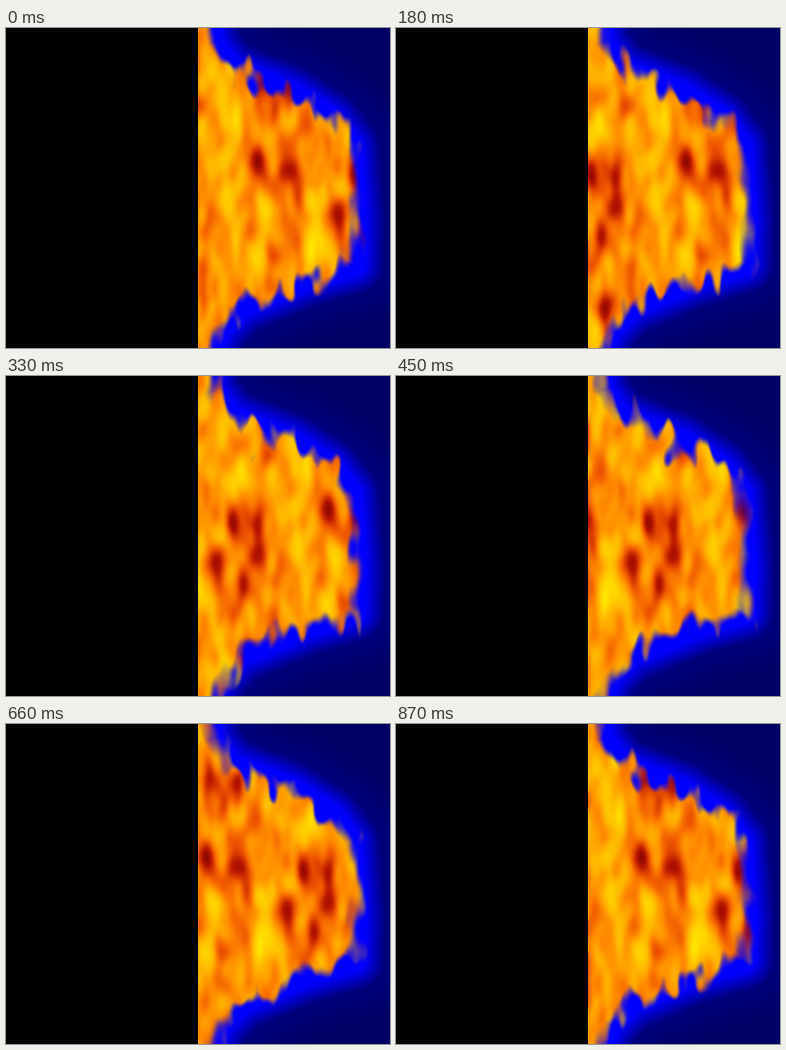
Recreate the animation shown at these times as a matplotlib script. Size 384 px wide and 320 px high, loop 900 ms.

```python
import numpy as np
import matplotlib.pyplot as plt
from matplotlib.animation import FuncAnimation
from matplotlib.path import Path

W, H, DPI = 384, 320, 100
SIDE = W // 2          # width of the flame panel and period of its texture
FRAMES, STEP = 30, 30
SPEED = SIDE / FRAMES  # the texture drifts right by one period per loop

X, Y = np.meshgrid(np.arange(SIDE) + 0.5, np.arange(H) + 0.5)

# Mean outline of the flame, in panel coordinates
OUTLINE = [(-80, -60), (8, -60), (13, 15), (33, 42), (93, 66), (133, 92),
           (152, 118), (157, 190), (156, 236), (108, 250), (43, 278),
           (21, 300), (10, 330), (4, 380), (-80, 380)]

# Main dark and bright patches on the periodic strip
EMBERS = [(66, 68), (58, 139), (88, 146), (90, 62), (139, 191), (184, 178),
          (178, 142), (172, 285), (156, 143), (168, 208)]
SPARKS = [(22, 55), (36, 108), (27, 170), (66, 190), (58, 240), (117, 165),
          (115, 215), (164, 98)]


def smooth(lo, hi, v):
    k = np.clip((v - lo) / (hi - lo), 0, 1)
    return k * k * (3 - 2 * k)


def depth(points):
    """Signed distance to a closed outline, positive inside."""
    best = np.full(X.shape, 1e9)
    for (ax, ay), (bx, by) in zip(points, points[1:] + points[:1]):
        dx, dy = bx - ax, by - ay
        k = np.clip(((X - ax) * dx + (Y - ay) * dy) / (dx * dx + dy * dy), 0, 1)
        best = np.minimum(best, np.hypot(X - ax - k * dx, Y - ay - k * dy))
    inside = Path(points).contains_points(np.c_[X.ravel(), Y.ravel()])
    return np.where(inside.reshape(X.shape), best, -best)


def blobs(points, rx, ry):
    out = np.zeros(X.shape)
    for u, y in points:
        du = (X - u + SIDE / 2) % SIDE - SIDE / 2
        out += np.exp(-0.5 * ((du / rx) ** 2 + ((Y - y) / ry) ** 2))
    return out


def noise(seed, sx, sy):
    """Smooth periodic noise with unit deviation."""
    raw = np.random.default_rng(seed).standard_normal(X.shape)
    fy = np.fft.fftfreq(H)[:, None]
    fx = np.fft.fftfreq(SIDE)[None, :]
    blur = np.exp(-2 * np.pi ** 2 * ((fx * sx) ** 2 + (fy * sy) ** 2))
    out = np.fft.ifft2(np.fft.fft2(raw) * blur).real
    return (out - out.mean()) / out.std()


def drift(tex, shift):
    whole = int(shift)
    part = shift - whole
    return (1 - part) * np.roll(tex, whole, 1) + part * np.roll(tex, whole + 1, 1)


heat = (0.59 + 0.085 * noise(4, 4, 9) - 0.42 * blobs(EMBERS, 6.5, 14)
        + 0.2 * blobs(SPARKS, 8, 18))
fray = noise(9, 3.6, 9)

body = depth(OUTLINE)
# The rim frays most along the top and bottom, little at the tip and root
reach = 7 * (0.45 + 0.55 * smooth(45, 85, abs(Y - 172))) * np.clip(X / 38, 0.3, 1)

back = np.zeros((H, SIDE, 3))
back[..., 2] = np.interp(-body, [11, 30, 65], [255, 125, 100])

STOPS = [0, 0.2, 0.4, 0.55, 0.7, 1]
RED = [120, 185, 240, 255, 255, 255]
GREEN = [0, 22, 88, 138, 182, 238]

image = np.zeros((H, W, 3), np.uint8)
fig = plt.figure(figsize=(W / DPI, H / DPI), dpi=DPI, facecolor="black")
ax = fig.add_axes([0, 0, 1, 1])
ax.axis("off")
pic = ax.imshow(image, interpolation="nearest", aspect="auto")


def draw(n):
    shift = SPEED * n
    h = drift(heat, shift)
    fire = np.dstack([np.interp(h, STOPS, RED), np.interp(h, STOPS, GREEN),
                      np.zeros_like(h)])
    cover = smooth(-9, 7, body + reach * drift(fray, shift))[..., None]
    image[:, SIDE:] = back + (fire - back) * cover
    pic.set_data(image)
    return [pic]


anim = FuncAnimation(fig, draw, frames=FRAMES, interval=STEP, repeat=True,
                     repeat_delay=0, blit=False)
plt.show()
```
